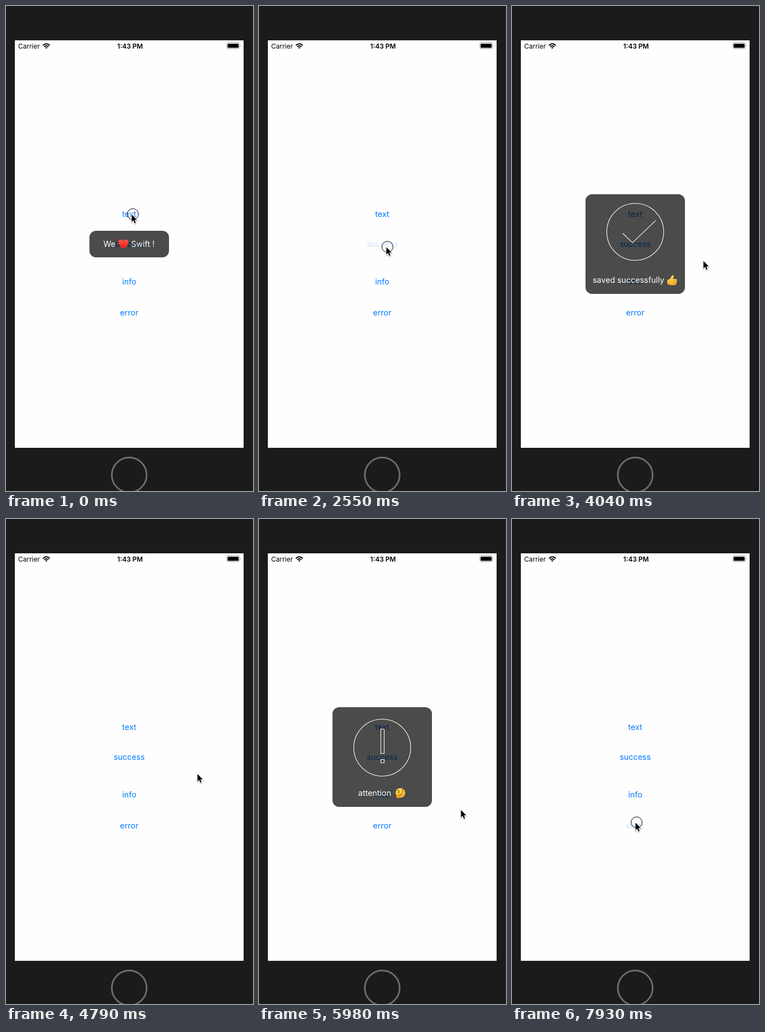
Animation of 447x876 px, one loop 8000 ms. Source, as an HTML page:

```html
<!DOCTYPE html>
<html lang="en">
<head>
<meta charset="utf-8">
<title>Toast messages</title>
<style>
  html, body { margin: 0; width: 100%; height: 100%; overflow: hidden; background: #1b1b1b; }
  svg { display: block; width: 447px; height: 876px; }
  text { font: 14.4px Inter, Roboto, sans-serif; }
  .status text { font-size: 12px; }
  .status .clock { font-weight: 600; text-anchor: middle; }
  .buttons { fill: #007aff; text-anchor: middle; }
  .toast { fill: #fff; }
  .panel { fill: #000; fill-opacity: .7; }
  .icon { fill: none; stroke: #fff; stroke-width: 1.1; }
</style>
</head>
<body>
<svg viewBox="0 0 447 876">
  <rect width="447" height="876" fill="#1b1b1b"/>
  <rect x="16" y="62" width="414" height="736" fill="#fefefe"/>
  <circle cx="223" cy="847" r="31.5" fill="none" stroke="#6d6d6d" stroke-width="3"/>

  <g class="status">
    <text x="22" y="76.6">Carrier</text>
    <g fill="none" stroke="#000" stroke-width="2">
      <path d="M66.8 71.2Q73 65.4 79.2 71.2M69.2 73.8Q73 70.3 76.8 73.8"/>
      <path d="M71 75L73 77.3L75 75Q73 73.3 71 75Z" fill="#000" stroke="none"/>
    </g>
    <text class="clock" x="224.5" y="76.6">1:43 PM</text>
    <rect x="399.5" y="66.5" width="23" height="10.5" rx="2.6" fill="none" stroke="#999"/>
    <rect x="401" y="68.2" width="20" height="7.3" rx="1.3"/>
    <path d="M424 70Q425.6 71.9 424 73.8Z" fill="#888"/>
  </g>

  <g class="buttons">
    <text x="223" y="381.3">text</text>
    <text id="success" x="223" y="435.3">success</text>
    <text id="info" x="223" y="503.3">info</text>
    <text id="error" x="223" y="559.3">error</text>
  </g>

  <g class="toast" id="textToast">
    <rect class="panel" x="151" y="406" width="144" height="48" rx="12"/>
    <text x="176.3" y="435.3">We</text>
    <path fill="url(#red)" d="M212.5 438.6C207 435.2 203.3 431.3 203.3 426.8C203.3 421.4 210 419.8 212.5 424.6C215 419.8 221.8 421.4 221.8 426.8C221.8 431.3 218 435.2 212.5 438.6Z"/>
    <text x="226.6" y="435.3">Swift !</text>
  </g>

  <g class="toast" id="successToast">
    <rect class="panel" x="133" y="340" width="180" height="180" rx="12"/>
    <g class="icon">
      <circle cx="223" cy="408" r="51.5"/>
      <path d="M200.4 410.5L218 427.6L260 387.4"/>
    </g>
    <text x="146" y="500.3">saved successfully</text>
    <path fill="url(#gold)" d="M281 494.8Q284 494.4 286.2 492.2L289.4 487.2Q290.2 485.4 291.8 486.6Q293.6 488 291.2 493H297Q299.4 493.6 298 495.6Q299.6 497 297.8 498.5Q299 500 297 501.3Q297.6 504 294 504.2H288Q284.5 504 281 501.7Z"/>
    <path fill="none" stroke="#cf8420" stroke-width=".7" d="M291.5 495.7H298M291.5 498.6H297.6M291.2 501.4H297"/>
  </g>

  <g class="toast" id="infoToast">
    <rect class="panel" x="133" y="340" width="180" height="180" rx="12"/>
    <g class="icon">
      <circle cx="223" cy="413" r="51.5"/>
      <path d="M220.5 379.5h6v44h-6zM220.5 434.5h6v6h-6z"/>
    </g>
    <text x="179.6" y="500.3">attention</text>
    <circle cx="255.8" cy="494.8" r="8.8" fill="url(#gold)"/>
    <g fill="none" stroke="#6b3b0c" stroke-linecap="round">
      <path d="M250.7 490.8Q252.4 489.5 254 490.6M258 489.2Q260 487.4 262 489.3M253.5 498.5Q256 496.8 259.5 497.8"/>
      <path stroke-width="2" d="M253 493v.5M260 492.5v.5"/>
    </g>
    <path fill="#f2a127" stroke="#c87814" stroke-width=".5" d="M248.6 497.2Q250.2 496 251 499L256.6 497.7Q258 498.5 256.5 499.4L254.6 500Q256.5 502.8 253 504.2Q249 504.7 248.5 501.5Z"/>
  </g>

  <g id="pointer">
    <circle id="ring" cx="2" cy="-.5" r="10" fill="none" stroke="#000"/>
    <path d="M0 1.5V15L3 12.1L5.2 17.3L7.4 16.4L5.2 11.3H9.5Z" opacity=".22" stroke="#000" stroke-width="2.2"/>
    <path d="M0 0V13.5L3 10.6L5.2 15.8L7.4 14.9L5.2 9.8H9.5Z" stroke="#fff" stroke-width="1.8" paint-order="stroke"/>
  </g>

  <defs>
    <linearGradient id="red" x2="0" y2="1">
      <stop stop-color="#ff5548"/><stop offset="1" stop-color="#e51b16"/>
    </linearGradient>
    <linearGradient id="gold" x2="0" y2="1">
      <stop stop-color="#ffdf55"/><stop offset="1" stop-color="#f6ae2b"/>
    </linearGradient>
  </defs>
</svg>
<script>
const LOOP = 8000, TICK = 150, FADE = 200, TOAST_LIFE = 1900, PRESS = 110;
const el = id => document.getElementById(id);

// Moments when the finger lifts, and when each toast starts to show.
const releases = { text: 40, success: 2650, info: 5490, error: 8040 };
const shown = { text: -250, success: releases.success, info: releases.info };

const home = { x: 227.5, y: 376.5 };
const moves = [
  { start: 300, end: 600, x: 365.5, y: 404.5 },
  { start: 1800, end: 2250, x: 230.5, y: 435.5 },
  { start: 3130, end: 3430, x: 345.5, y: 461 },
  { start: 3580, end: 4030, x: 346.5, y: 460.5 },
  { start: 4780, end: 5380, x: 250.5, y: 502.5 },
  { start: 5530, end: 5980, x: 365.5, y: 525.5 },
  { start: 7255, end: 7780, x: 223.5, y: 548.5 }
];

// Ease-out progress, held at 0 before the start and at 1 after the end.
function ease(time, start, duration) {
  const p = Math.min(1, Math.max(0, (time - start) / duration));
  return 1 - (1 - p) ** 2;
}

function snap(time) {
  const phase = time < 3000 ? 0 : 130;
  return Math.floor((time - phase) / TICK) * TICK + phase;
}

const isPressed = (time, release) => time >= release - PRESS && time < release;

function pointerAt(time) {
  return moves.reduce((at, { start, end, x, y }) => {
    const p = ease(time, start, end - start);
    return { x: at.x + (x - at.x) * p, y: at.y + (y - at.y) * p };
  }, home);
}

function render(time) {
  const { x, y } = pointerAt(time);
  el("pointer").setAttribute("transform", `translate(${x} ${y})`);
  const pressed = Object.values(releases).some(release => isPressed(time, release));
  el("ring").setAttribute("opacity", pressed ? 1 : 0);

  for (const name in shown) {
    const start = shown[name];
    const opacity = ease(time, start, FADE) - ease(time, start + TOAST_LIFE, FADE);
    el(name + "Toast").setAttribute("opacity", opacity);
  }
  for (const name of ["success", "info", "error"]) {
    const release = releases[name];
    const opacity = time < release - PRESS ? 1 : .2 + .8 * ease(time, release, FADE);
    el(name).setAttribute("opacity", opacity);
  }
}

const begin = performance.now();
function tick() {
  render(snap((performance.now() - begin) % LOOP));
  requestAnimationFrame(tick);
}
tick();
</script>
</body>
</html>
```
